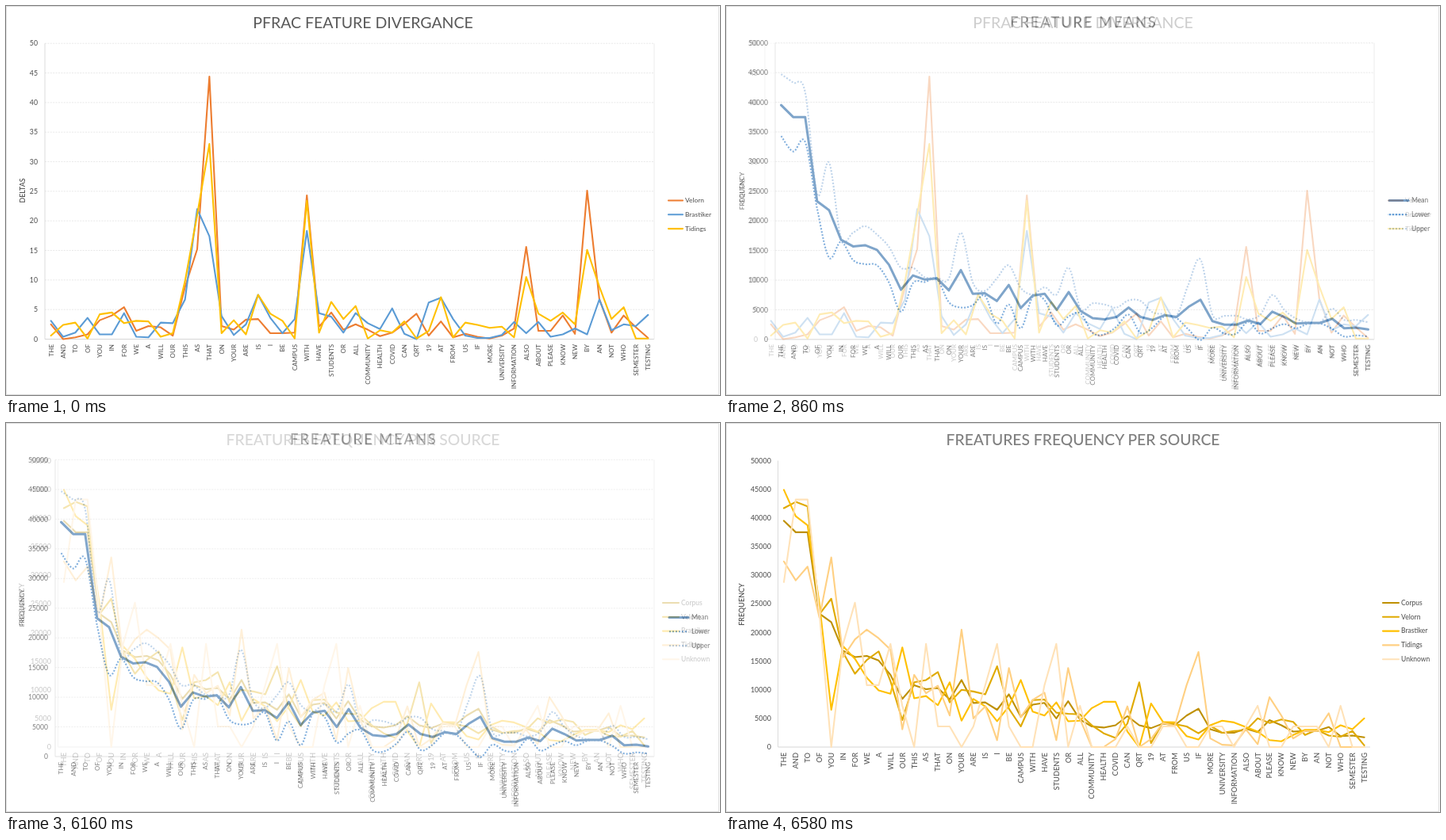
An HTML page that plays this animation: 900 by 491 pixels, repeating every 8 s.

```html
<!DOCTYPE html>
<html lang="en">
<head>
<meta charset="utf-8">
<title>Feature charts</title>
<style>
  html, body { margin: 0; width: 100%; height: 100%; overflow: hidden; background: #fff; }
  svg { display: block; width: 100%; height: 100%; }
  text { font-family: Lato, "Open Sans", sans-serif; fill: #595959; }
  path { fill: none; stroke-linejoin: round; }
</style>
</head>
<body>
<svg id="stage" viewBox="0 0 900 491"></svg>
<script>
const words = ('THE AND TO OF YOU IN FOR WE A WILL OUR THIS AS THAT ON YOUR ARE IS I BE CAMPUS WITH HAVE ' +
  'STUDENTS OR ALL COMMUNITY HEALTH COVID CAN QRT 19 AT FROM US IF MORE UNIVERSITY INFORMATION ALSO ' +
  'ABOUT PLEASE KNOW NEW BY AN NOT WHO SEMESTER TESTING').split(' ');

// Deltas per author
const deltaA = [2.5, 0, .3, .8, 3.2, 4, 5.4, 1.4, 2.2, 2, .6, 8.8, 15.2, 44.4, 2.2, 1.6, 3.3, 3.4, 1, 1, 1.1, 24.3, 2.1, 4.5, 1.6,
  2.5, 1.6, .5, 1.1, 2.6, 4.3, .6, 3, .3, .9, .4, .1, .6, 1.8, 15.6, 1.4, 1.4, 4, .9, 25.1, 6.8, 1.1, 4, 2, .2];
const deltaB = [3.1, .4, 1.1, 3.6, .8, .8, 4.4, .4, .3, 2.8, 2.7, 6.7, 22, 17.4, 3.9, .7, 2.5, 7.5, 3.6, 1, 3.4, 18.3, 4.4, 3.8, 1.1,
  4.4, 2.7, 1.7, 5.2, .9, 0, 6.2, 7, 3.4, .6, .2, .2, .7, 2.9, 1, 2.9, .4, .8, 1.8, .8, 6.7, 1.5, 2.5, 2.2, 4.1];
const deltaC = [.6, 2.4, 2.8, .1, 4.2, 4.5, 2.7, 3.1, 3, .4, 1, 9.8, 21, 33, 1, 3.2, .8, 7.5, 4.3, 3.1, .1, 23.4, 1.1, 6.3, 3.4,
  5.6, .1, 1.5, 1.1, 3, .1, 1.4, 7.1, .3, 2.8, 2.4, 1.9, 2.1, .3, 10.5, 4.3, 3.1, 4.5, 2.5, 15.1, 8.9, 3.4, 5.4, .1, .1];

// Frequencies in hundreds
const mean = [395, 375, 375, 233, 218, 168, 157, 159, 151, 126, 84, 108, 101, 103, 83, 117, 77, 78, 65, 92, 53, 74, 77, 50, 80,
  48, 36, 34, 38, 54, 38, 33, 41, 38, 55, 67, 31, 25, 25, 32, 26, 47, 38, 27, 28, 28, 35, 19, 20, 17];
const spread = [52, 58, 42, 12, 80, 3, 23, 32, 26, 30, 37, 13, 4, 1, 20, 63, 19, 4, 38, 33, 34, 2, 11, 26, 41,
  4, 25, 25, 16, 12, 27, 13, 2, 2, 38, 68, 11, 15, 15, 2, 16, 28, 12, 8, 1, 1, 17, 14, 13, 12];
const freqA = [417, 428, 420, 232, 259, 165, 128, 152, 167, 115, 47, 113, 117, 131, 78, 100, 97, 92, 141, 67, 36, 82, 83, 60, 58,
  57, 38, 24, 16, 41, 113, 7, 43, 40, 36, 24, 37, 25, 28, 29, 50, 42, 48, 44, 21, 30, 20, 18, 28, 3];
const freqB = [449, 403, 387, 250, 65, 176, 154, 121, 99, 93, 174, 85, 89, 73, 113, 46, 84, 71, 45, 71, 117, 62, 55, 78, 45,
  46, 68, 79, 79, 27, 0, 76, 44, 43, 19, 13, 38, 46, 43, 35, 27, 12, 10, 21, 30, 30, 26, 38, 31, 50];
const freqC = [324, 291, 315, 226, 331, 157, 188, 205, 190, 170, 31, 126, 94, 107, 55, 205, 50, 71, 12, 138, 52, 82, 95, 12, 138,
  49, 0, 0, 14, 71, 0, 14, 42, 37, 108, 166, 15, 4, 3, 31, 5, 87, 55, 15, 28, 28, 59, 0, 0, 0];
// Multiples of one occurrence
const freqD = [8, 12, 12, 6.5, 0, 5, 7, 3, 3, 5, 2, 0, 5, 1, 1, 0, 1, 3, 5, 1, 0, 0, 3, 5, 0,
  2, 0, 0, 0, 1, 0, 0, 1, 1, 0, 0, 1, 1, 0, 1, 2, 0, 0, 1, 1, 1, 0, 2, 0, 0].map(n => n * 36);

const charts = [
  {
    title: 'PFRAC FEATURE DIVERGANCE', titleSize: 19.5, titleFill: '#595959', titleY: 28,
    axis: 'DELTAS', axisSize: 8.9, axisX: 24, axisY: 233,
    left: 49, right: 817, top: 47.2, bottom: 420.5, max: 50, grid: true,
    tickX: 40, tickSize: 8.8, wordSize: 8, wordY: 427,
    legend: { x: 834, len: 20, textX: 856, y: 245.5, size: 8.4 },
    series: [
      { name: 'Velorn', data: deltaA, color: '#ed7d31' },
      { name: 'Brastiker', data: deltaB, color: '#5b9bd5' },
      { name: 'Tidings', data: deltaC, color: '#ffc000' }
    ]
  },
  {
    title: 'FREATURE MEANS', titleSize: 18.5, titleFill: '#838383', titleY: 27, spacing: 1.8, titleWeight: 500,
    axis: 'FREQUENCY', axisSize: 8, axisX: 23, axisY: 233.5,
    left: 62, right: 817, top: 46.5, bottom: 421, max: 500, grid: true,
    tickX: 53, tickSize: 8.6, wordSize: 8, wordY: 428,
    legend: { x: 835, len: 26, textX: 864, y: 245.5, size: 8.5 },
    series: [
      { name: 'Mean', data: mean, color: '#4a7fb5', width: 3 },
      { name: 'Lower', data: mean.map((m, i) => m - spread[i]), color: '#4f8fd0', dotted: true },
      { name: 'Upper', data: mean.map((m, i) => m + spread[i]), color: '#a5c3e3', dotted: true }
    ]
  },
  {
    title: 'FREATURES FREQUENCY PER SOURCE', titleSize: 19.3, titleFill: '#7f7f7f', titleY: 28, titleWeight: 500,
    axis: 'FREQUENCY', axisSize: 9, axisX: 23, axisY: 229,
    left: 65.5, right: 812, top: 47.5, bottom: 409, max: 500,
    tickX: 57, tickSize: 9, wordSize: 9.3, wordY: 416,
    legend: { x: 827, len: 22, textX: 851, y: 227, size: 8.5 },
    series: [
      { name: 'Corpus', data: mean, color: '#bf9000' },
      { name: 'Velorn', data: freqA, color: '#e0aa00' },
      { name: 'Brastiker', data: freqB, color: '#ffc000' },
      { name: 'Tidings', data: freqC, color: '#ffd083' },
      { name: 'Unknown', data: freqD, color: '#ffe2b8' }
    ]
  }
];

function add(parent, tag, attrs, content) {
  const el = document.createElementNS('http://www.w3.org/2000/svg', tag);
  for (const k in attrs) el.setAttribute(k, attrs[k]);
  if (content !== undefined) el.textContent = content;
  return parent.appendChild(el);
}

const line = (g, x1, y1, x2, y2, attrs) =>
  add(g, 'path', { d: `M${x1} ${y1}L${x2} ${y2}`, ...attrs });

const polyline = pts => 'M' + pts.map(p => p.join(' ')).join('L');

function smooth(pts) {
  let d = 'M' + pts[0].join(' ');
  for (let i = 0; i < pts.length - 1; i++) {
    const a = pts[Math.max(i - 1, 0)], b = pts[i], c = pts[i + 1], e = pts[Math.min(i + 2, pts.length - 1)];
    d += `C${b[0] + (c[0] - a[0]) / 6} ${b[1] + (c[1] - a[1]) / 6} ` +
      `${c[0] - (e[0] - b[0]) / 6} ${c[1] - (e[1] - b[1]) / 6} ${c[0]} ${c[1]}`;
  }
  return d;
}

function build(svg, c) {
  const g = add(svg, 'g', {});
  add(g, 'rect', { width: 900, height: 491, fill: '#fff' });
  add(g, 'rect', { x: .5, y: .5, width: 898, height: 490, fill: 'none', stroke: '#dedede' });
  add(g, 'text', {
    x: 450 + (c.spacing || 0) / 2, y: c.titleY, 'text-anchor': 'middle', 'font-size': c.titleSize,
    'font-weight': c.titleWeight || 400, 'letter-spacing': c.spacing || 0, style: `fill:${c.titleFill}`
  }, c.title);
  add(g, 'text', {
    transform: `translate(${c.axisX} ${c.axisY}) rotate(-90)`, 'text-anchor': 'middle',
    'font-size': c.axisSize, 'font-weight': 500, style: 'fill:#4a4a4a'
  }, c.axis);

  const stepY = (c.bottom - c.top) / 10;
  for (let i = 0; i <= 10; i++) {
    const y = c.bottom - i * stepY;
    if (c.grid && i) line(g, c.left, y, c.right, y, { stroke: '#e2e2e2', 'stroke-width': .8, 'stroke-dasharray': '2 1.4' });
    add(g, 'text', { x: c.tickX, y: y + 3.1, 'text-anchor': 'end', 'font-size': c.tickSize, 'font-weight': 500 },
      i * 5 * (c.max > 50 ? 1000 : 1));
  }
  line(g, c.left, c.top, c.left, c.bottom, { stroke: '#dcdcdc' });
  line(g, c.left, c.bottom, c.right, c.bottom, { stroke: '#d6d6d6' });
  if (c.grid) line(g, c.right, c.top, c.right, c.bottom, { stroke: '#ececec' });

  const stepX = (c.right - c.left) / words.length;
  const px = i => c.left + (i + .5) * stepX;
  words.forEach((w, i) => add(g, 'text', {
    transform: `translate(${px(i) + c.wordSize * .36} ${c.wordY}) rotate(-90)`,
    'text-anchor': 'end', 'font-size': c.wordSize, 'font-weight': 500
  }, w));

  // Solid lines go over dotted ones
  const style = s => ({
    stroke: s.color, 'stroke-width': s.width || 2.1,
    ...(s.dotted ? { 'stroke-dasharray': '2 2' } : { 'stroke-linecap': 'round' })
  });
  const order = [...c.series].sort((a, b) => !!b.dotted - !!a.dotted);
  for (const s of order) {
    const pts = s.data.map((v, i) => [px(i), c.bottom - v / c.max * (c.bottom - c.top)]);
    add(g, 'path', { d: s.dotted ? smooth(pts) : polyline(pts), ...style(s) });
  }

  const k = c.legend;
  c.series.forEach((s, i) => {
    const y = k.y + i * 17.8;
    line(g, k.x + 1, y, k.x + k.len - 1, y, style(s));
    add(g, 'text', { x: k.textX, y: y + 2.8, 'font-size': k.size, 'font-weight': 500 }, s.name);
  });
  return g;
}

const layers = charts.map(c => build(document.getElementById('stage'), c));

// Ten fade steps of 60 ms, the first one at the start time
const fade = (t, start) => Math.min(1, Math.max(0, Math.floor((t - start) / 60) + 1) / 10);

function draw(t) {
  layers[1].setAttribute('opacity', fade(t, 500));
  layers[2].setAttribute('opacity', fade(t, 6040));
}

const begin = performance.now();
function tick(now) {
  draw(Math.max(0, now - begin) % 8000);
  requestAnimationFrame(tick);
}
draw(0);
requestAnimationFrame(tick);
</script>
</body>
</html>
```
